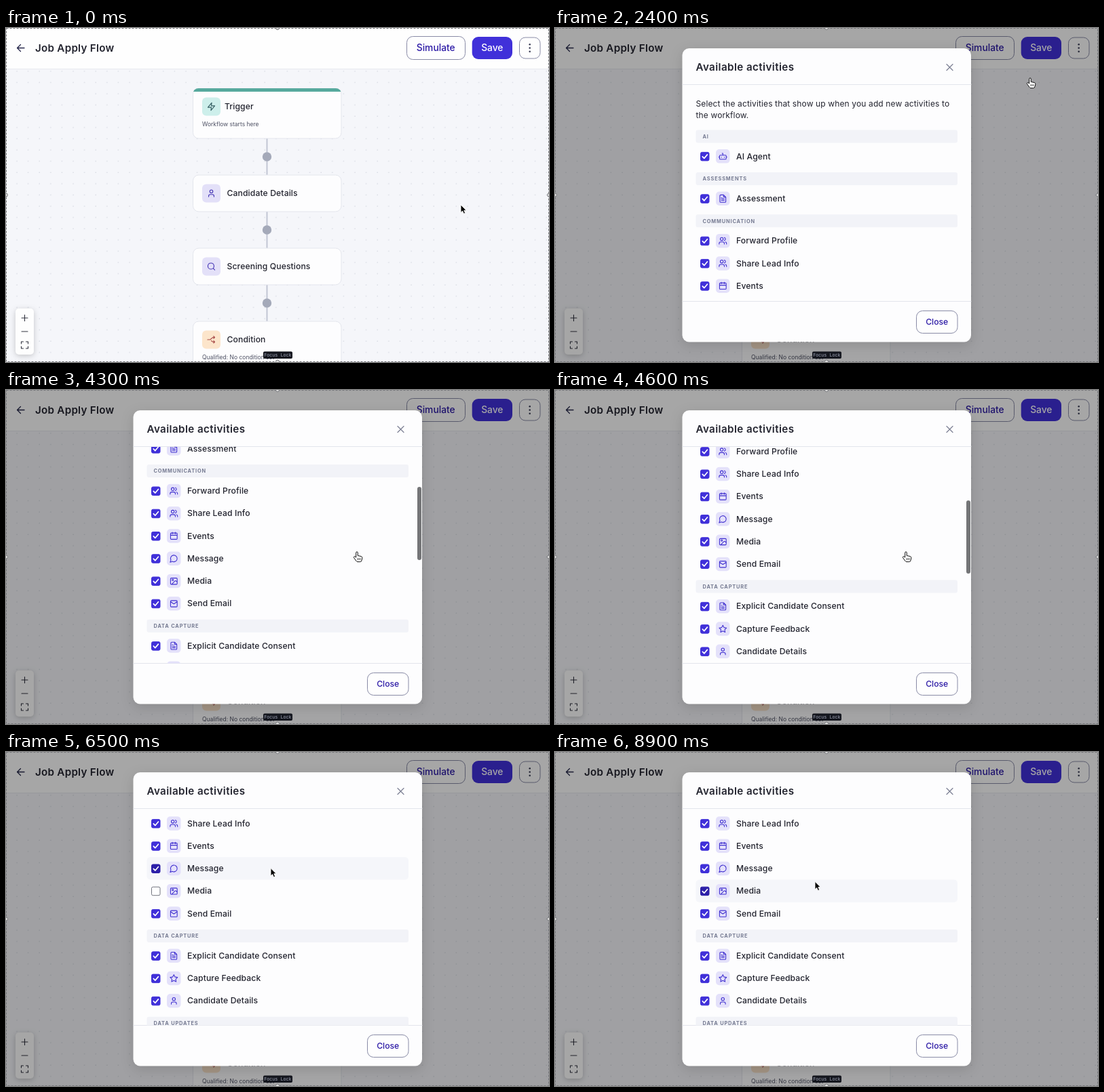
Recreate the animation shown at these times as an HTML page. Size 800 by 493 pixels, loop 9000 ms.

```html
<!DOCTYPE html>
<html lang="en">
<head>
<meta charset="utf-8">
<title>Workflow editor</title>
<style>
html, body { margin: 0; width: 100%; height: 100%; overflow: hidden; background: #f5f6fa }
svg { display: block; width: 800px; height: 493px; font-family: Inter, "Open Sans", sans-serif }
text { fill: #23242f; white-space: pre }
.title { font-size: 15.2px; font-weight: 600; letter-spacing: .25px }
#panel .title { letter-spacing: .4px }
.label { font-size: 12.2px; font-weight: 500; letter-spacing: .1px }
.body { font-size: 12px; letter-spacing: .13px }
.small { font-size: 8.5px; fill: #4d5063 }
.head { font-size: 7.4px; font-weight: 700; letter-spacing: .85px; fill: #767b92 }
.btn { font-size: 13.8px; font-weight: 500; fill: #2d1ba6; text-anchor: middle }
.tag { font: 6.7px "Liberation Mono", monospace; fill: #a3a8ba }
.shadow { filter: drop-shadow(0 2px 4px #0003) }
.lift { filter: drop-shadow(0 5px 9px #0002) }
.icon { fill: none; stroke-linecap: round; stroke-linejoin: round }
.row .bg { fill: none }
.row.hover .bg { fill: #f5f6fa }
.box { fill: #4030d9; stroke: #4030d9 }
.hover .box { fill: #2c1fa8; stroke: #2c1fa8 }
.off .box { fill: #fff; stroke: #73757f }
.off .tick { display: none }
</style>
</head>
<body>
<svg viewBox="0 0 800 493">
  <defs>
    <pattern id="dots" x="8" y="6" width="16.6" height="16.6" patternUnits="userSpaceOnUse">
      <circle cx="8" cy="8" r=".65" fill="#c6c9d4"/>
    </pattern>
    <clipPath id="view"><path d="M188 84h425v319.500h-425z"/></clipPath>
    <clipPath id="card"><rect x="275.500" y="89" width="218.500" height="74" rx="8"/></clipPath>
  </defs>
  <g id="page"></g>
  <g id="menu"></g>
  <g id="modal">
    <rect width="800" height="493" fill="#000" opacity=".35"/>
    <g id="panel"></g>
    <g clip-path="url(#view)"><g id="list"></g></g>
    <rect id="thumb" x="606" width="6" height="108" rx="3" fill="#747577"/>
  </g>
  <g id="frame"></g>
  <g id="cursor" stroke-linejoin="round">
    <path id="arrow" d="M0 0V11.500L2.600 9 4.500 13.200 6.600 12.300 4.800 8.200H8.200Z" fill="#000" stroke="#fff" stroke-width=".9"/>
    <g id="hand" fill="#fff" stroke="#111" stroke-width="1">
      <path d="M-1.300 1.200a1.300 1.300 0 0 1 2.600 0V5.500l4.800 1q1.800.5 1.800 2.300l-.8 3.400q-.4 2.400-2.400 2.400H1q-1.200 0-2-1.200L-4.400 8.600q-.8-1.400.4-1.900 1-.3 2.700 1.400z"/>
      <path d="M1 9v3M3 9v3M5 9v3" stroke-width=".7"/>
    </g>
  </g>
</svg>
<script>
const $ = id => document.getElementById(id);
const sheet = 'M5 4h14a2 2 0 0 1 2 2v13a2 2 0 0 1-2 2H5a2 2 0 0 1-2-2V6a2 2 0 0 1 2-2';
const gear = 'M' + Array.from({length: 32}, (_, i) => {
  const a = (i - .5) * Math.PI / 16, r = i % 4 < 2 ? 10.5 : 8;
  return (12 + r * Math.cos(a)).toFixed(1) + ' ' + (12 + r * Math.sin(a)).toFixed(1);
}).join('L') + 'zM15 12a3 3 0 1 1-6 0 3 3 0 0 1 6 0';
const icons = {
  gear,
  zap: 'M13 2 3 14h9l-1 8 10-12h-9z',
  user: 'M19 21v-2a4 4 0 0 0-4-4H9a4 4 0 0 0-4 4v2M16 7a4 4 0 1 1-8 0 4 4 0 0 1 8 0',
  search: 'M19 11a8 8 0 1 1-16 0 8 8 0 0 1 16 0M21 21l-4.300-4.300',
  split: 'M2 12h7l7-6h5m-3-3 3 3-3 3M12 15l4 3h5m-3-3 3 3-3 3',
  trash: 'M3 6h18M19 6v14a2 2 0 0 1-2 2H7a2 2 0 0 1-2-2V6M8 6V4a2 2 0 0 1 2-2h4a2 2 0 0 1 2 2v2M10 11v6M14 11v6',
  bot: 'M5 9h14a2 2 0 0 1 2 2v7a2 2 0 0 1-2 2H5a2 2 0 0 1-2-2v-7a2 2 0 0 1 2-2M12 9V4h-2M1 14h2M21 14h2M8 14v1M16 14v1',
  file: 'M14 2H6a2 2 0 0 0-2 2v16a2 2 0 0 0 2 2h12a2 2 0 0 0 2-2V8zM14 2v6h6M16 13H8M16 17H8M10 9H8',
  users: 'M16 21v-2a4 4 0 0 0-4-4H6a4 4 0 0 0-4 4v2M13 7a4 4 0 1 1-8 0 4 4 0 0 1 8 0M22 21v-2a4 4 0 0 0-3-3.900M16 3.100a4 4 0 0 1 0 7.800',
  calendar: sheet + 'M16 2v4M8 2v4M3 10h18',
  message: 'M7.900 20A9 9 0 1 0 4 16.100L2 22z',
  image: sheet + 'M11 9a2 2 0 1 1-4 0 2 2 0 0 1 4 0M21 15l-3-3a2 2 0 0 0-3 0l-9 9',
  mail: sheet + 'M21 7l-9 6-9-6',
  star: 'M12 2l3.100 6.300 6.900 1-5 4.900 1.200 6.800L12 17.800 5.800 21 7 14.200 2 9.300l6.900-1z'
};

const rect = (x, y, w, h, r, fill, more = '') =>
  `<rect x="${x}" y="${y}" width="${w}" height="${h}" rx="${r}" fill="${fill}" ${more}/>`;
const text = (x, y, cls, s, more = '') => `<text x="${x}" y="${y}" class="${cls}" ${more}>${s}</text>`;
const line = (d, color, w = 1) => `<path class="icon" d="${d}" stroke="${color}" stroke-width="${w}"/>`;
const icon = (name, cx, cy, size, color) =>
  `<g transform="translate(${cx - size / 2} ${cy - size / 2}) scale(${size / 24})">${line(icons[name], color, 2)}</g>`;
const outline = 'stroke="#898ba6"';

function card(y, h, name, label, tint, color, labelX = 325.5) {
  const cy = y + 27;
  return rect(275.5, y, 218.5, h, 8.5, '#fdfdfe', 'stroke="#e4e6ed"') +
    rect(289, cy - 13.5, 27, 27, 6, tint) + icon(name, 302.5, cy, 13.5, color) +
    text(labelX, cy + 4.3, 'label', label);
}

$('page').innerHTML =
  rect(0, 0, 800, 493, 0, '#f5f6fa') + rect(0, 60, 800, 433, 0, 'url(#dots)') +
  rect(0, 0, 800, 60, 0, '#fefefe') + line('M0 60.500H800', '#e8e9ef') +
  line('M27 29.500H16.500M21.500 24.500l-5 5 5 5', '#25264a', 1.3) +
  text(43, 34.6, 'title', 'Job Apply Flow') +
  rect(590.5, 12.5, 86, 34, 9, '#fefefe', outline) + text(633.2, 34.4, 'btn', 'Simulate') +
  rect(686.7, 13, 59.3, 33, 9, '#4030d9') + text(716.3, 34.4, 'btn', 'Save', 'style="fill:#fff"') +
  rect(756.5, 14, 30.5, 31, 8.5, '#fefefe', outline + ' id="more"') +
  [24.3, 29.5, 34.7].map(y => `<circle cx="771.7" cy="${y}" r="1.3" fill="#3a3c55"/>`).join('') +
  line('M384.500 163V433', '#c1c5d3', 2) +
  [190, 298, 406].map(y => `<circle cx="384.5" cy="${y}" r="6.7" fill="#a4a9b9"/>`).join('') +
  card(89, 74, 'zap', 'Trigger', '#cdefeb', '#355f63', 322) +
  '<path d="M275 89h220v5h-220z" fill="#56a99d" clip-path="url(#card)"/>' +
  text(289, 145, 'small', 'Workflow starts here') +
  card(217, 54, 'user', 'Candidate Details', '#e3e0f8', '#4434b4') +
  card(325, 54, 'search', 'Screening Questions', '#e3e0f8', '#4434b4') +
  card(433, 74, 'split', 'Condition', '#fce5cb', '#a84a48') +
  text(289, 489.3, 'small', 'Qualified: No condition set') +
  rect(14, 414, 27, 68, 5, '#fefefe', 'class="shadow"') +
  line('M23 428h9M27.500 423.500v9M23 448h9', '#30323f', 1.1) +
  line('M22.500 466v-3h3M29.500 463h3v3M32.500 470v3h-3M25.500 473h-3v-3', '#30323f', 1.1);

$('menu').innerHTML =
  rect(602, 53, 185, 66.5, 6, '#fefefe', 'class="shadow"') +
  rect(602, 56, 185, 30, 0, '#f3f4f9', 'id="item"') +
  icon('gear', 622, 71, 12.5, '#52566f') + text(635, 75.2, 'body', 'Available activities') +
  icon('trash', 622, 101, 12.5, '#cf3434') + text(635, 105.2, 'body', 'Delete workflow');

$('panel').innerHTML =
  rect(187.5, 30, 425.5, 433.5, 10, '#fdfdfe', 'class="lift"') +
  text(207.5, 63.2, 'title', 'Available activities') +
  line('M577 53.500l9 9M586 53.500l-9 9', '#7b7f93', 1.2) +
  line('M188 83.500H613M188 403.500H613', '#e3e5ec') +
  rect(532.5, 417.5, 60.5, 33, 9, '#fefefe', outline) +
  text(562.7, 438.2, 'btn', 'Close', 'style="font-size:12.2px"');

// Entries without an icon are section headings.
const entries = [
  ['AI'], ['AI Agent', 'bot'],
  ['ASSESSMENTS'], ['Assessment', 'file'],
  ['COMMUNICATION'], ['Forward Profile', 'users'], ['Share Lead Info', 'users'], ['Events', 'calendar'],
  ['Message', 'message'], ['Media', 'image'], ['Send Email', 'mail'],
  ['DATA CAPTURE'], ['Explicit Candidate Consent', 'file'], ['Capture Feedback', 'star'], ['Candidate Details', 'user'],
  ['DATA UPDATES']
];
let y = 160, list = text(207.5, 116, 'body', 'Select the activities that show up when you add new activities to') +
  text(207.5, 132.6, 'body', 'the workflow.');
const rowY = [];
entries.forEach(([label, name], i) => {
  if (i) y += !name ? 33 : entries[i - 1][1] ? 33.25 : 29.4;
  if (name) {
    rowY.push(y);
    list += `<g class="row">` + rect(207.5, y - 16.6, 385.5, 33.2, 5, 'none', 'class="bg"') +
      rect(214.5, y - 6, 12.5, 12.5, 2, '', 'class="box"') +
      `<path class="icon tick" d="M217.300 ${y + .4}l2.500 2.600 4.600-5.500" stroke="#fff" stroke-width="1.700"/>` +
      rect(237, y - 10.3, 20.5, 20.5, 5, '#e4e1fa') + icon(name, 247.3, y, 13, '#4030d0') +
      text(267, y + 4.1, 'label', label) + '</g>';
  } else {
    list += rect(207.5, y - 9.5, 385.5, 19, 3, '#f2f3f8') + text(217.5, y + 2.8, 'head', label);
  }
});
$('list').innerHTML = list;
const rows = [...document.querySelectorAll('.row')];
const media = 6;

$('frame').innerHTML =
  rect(.5, .5, 799, 492, 0, 'none', 'stroke="#77787c" stroke-dasharray="3 2"') +
  [[400, 0], [0, 246.5], [800, 246.5], [400, 492.5]].map(([x, y]) =>
    `<circle cx="${x}" cy="${y}" r="2.5" fill="#ddd" stroke="#77787c"/>`).join('') +
  rect(379, 477.5, 43, 10.5, 2, '#14161e') + text(380.3, 485, 'tag', 'Focus Lock');

const path = [
  [0, 670, 261], [900, 769, 36], [1500, 769, 36], [2000, 700, 74], [2400, 700, 74],
  [3200, 517, 239], [4700, 517, 239], [5000, 396, 204], [5200, 396, 204], [5500, 393, 169.5],
  [7500, 387, 173.5], [8100, 387, 173.5], [8500, 383, 191.3], [9000, 383, 191.3]
];
function pointer(t) {
  const i = path.findIndex(p => p[0] > t), [t0, x0, y0] = path[i - 1], [t1, x1, y1] = path[i];
  const u = (t - t0) / (t1 - t0), e = u * u * (3 - 2 * u);
  return [x0 + (x1 - x0) * e, y0 + (y1 - y0) * e];
}
const show = (id, on) => $(id).style.display = on ? '' : 'none';

function draw(t) {
  const [px, py] = pointer(t), open = t >= 2400, menu = t >= 1100 && !open;
  const u = Math.min(1, Math.max(0, (t - 3900) / 1100));
  const scroll = 242 * (1 - (1 - u) ** 2.54), scrolling = u > 0 && t < 4800;
  const hand = (menu && py > 56) || (open && t < 5200);

  show('menu', menu);
  show('item', py > 56 && px < 787);
  show('modal', open);
  $('more').setAttribute('fill', menu || (!open && px > 756 && py < 45) ? '#dfe2ef' : '#fefefe');
  $('list').setAttribute('transform', `translate(0 ${-scroll})`);
  show('thumb', u > 0 && t < 5300);
  $('thumb').setAttribute('y', 86 + scroll * .345);
  rows.forEach((row, i) => {
    const inside = Math.abs(rowY[i] - scroll - py) < 16.6 && px > 207 && px < 593;
    row.classList.toggle('hover', inside && !scrolling);
    row.classList.toggle('off', i === media && t >= 5100 && t < 8600);
  });
  $('cursor').setAttribute('transform', `translate(${px} ${py})`);
  show('hand', hand);
  show('arrow', !hand);
}

// The picture advances in steps of 100 ms.
const start = performance.now();
function tick() {
  draw(Math.floor(Math.max(0, performance.now() - start) % 9000 / 100) * 100);
  requestAnimationFrame(tick);
}
tick();
</script>
</body>
</html>
```
